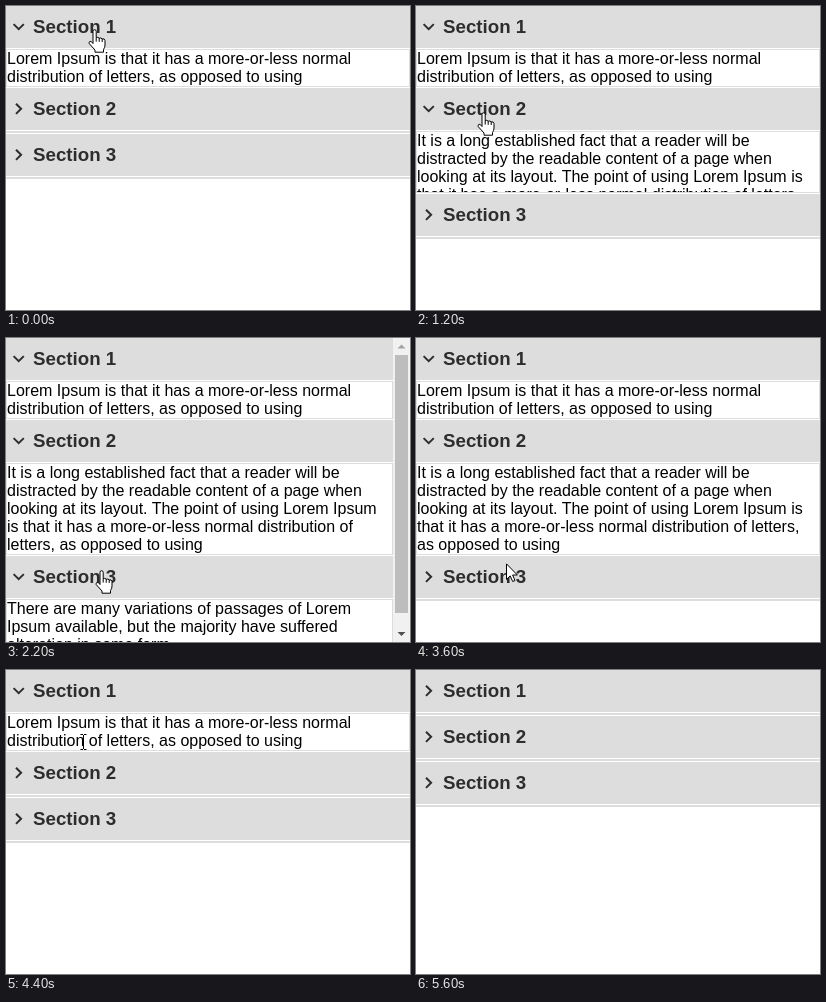
An HTML page for the animation above (6000 ms loop, 404 by 304 pixels).

```html
<!DOCTYPE html>
<html lang="en">
<head>
<meta charset="utf-8">
<title>Accordion</title>
<style>
  html, body { margin: 0; width: 100%; height: 100%; overflow: hidden; background: #fff; }
  #stage { position: relative; width: 404px; height: 304px; overflow: hidden;
    font-family: "Liberation Sans", Arial, sans-serif; }
  #list { width: 404px; }
  #list.narrow { width: 387px; }
  .head { position: relative; height: 42px; background: #ddd; color: #2d2d2d;
    font-size: 18.72px; font-weight: bold; line-height: 41px; text-indent: 27px; white-space: nowrap; }
  .head svg { position: absolute; left: 0; top: 0; }
  .panel { margin: 1px 0; border: 1px solid #ddd; overflow: hidden; color: #000;
    font-size: 16px; line-height: 18px; white-space: pre; }
  .sheet { position: absolute; left: 0; top: 0; }
</style>
</head>
<body>
<div id="stage">
  <div id="list"></div>
  <svg class="sheet" width="404" height="304">
    <g id="bar">
      <path fill="#f1f1f1" d="M387 0h17v304h-17z"/>
      <path fill="#bdbdbd" d="M389 17h13v258h-13z"/>
      <path fill="#a3a3a3" d="M391.5 10.5l4-4 4 4z"/>
      <path fill="#505050" d="M391.5 294l4 4 4-4z"/>
    </g>
    <g id="hand" fill="#fff" stroke="#000" stroke-linejoin="round">
      <path d="M5 14.5V2.3a1.6 1.6 0 0 1 3.2 0V8.6q1.6-.9 3 .6 1.8-.8 3 .7 2.3-.7 2.8 1.6V16q0 2.5-1.5 4.5v2.7H7V21L1.2 14.6q-.6-1.8.9-2.3 1.4-.2 2.9 2.2z"/>
      <path fill="none" d="M8.2 8.6v4M11.2 9.2v3.6M14.2 10v3"/>
    </g>
    <path id="arrow" fill="#fff" stroke="#000" d="M.5.9V16.4L4.2 12.9 6.7 18.5 9 17.5 6.6 12H11.4z"/>
    <path id="beam" fill="none" stroke="#000" d="M.5.5h2.5m1 0h2.5M3.5 1v14M.5 15.5h2.5m1 0h2.5"/>
  </svg>
</div>
<script>
const LOOP = 6000;
const $ = id => document.getElementById(id);

const texts = [
  ["Lorem Ipsum is that it has a more-or-less normal",
   "distribution of letters, as opposed to using"],
  ["It is a long established fact that a reader will be",
   "distracted by the readable content of a page when",
   "looking at its layout. The point of using Lorem Ipsum is",
   "that it has a more-or-less normal distribution of letters,",
   "as opposed to using"],
  ["There are many variations of passages of Lorem",
   "Ipsum available, but the majority have suffered",
   "alteration in some form"]
].map(lines => lines.join("\n"));

// The scrollbar makes the second text wrap earlier.
const narrowText = texts[1]
  .replace("Ipsum is\nthat", "Ipsum\nis that")
  .replace("of letters,\nas", "of\nletters, as");

// time, cursor, left, top
const pointer = [
  [0, "hand", 82, 23], [600, "beam", 83, 43], [800, "arrow", 75, 84],
  [1000, "hand", 61, 107], [1200, "hand", 61, 106], [1400, "beam", 86, 170],
  [1600, "hand", 96, 241], [1800, "hand", 92, 233], [2000, "hand", 89, 232],
  [3600, "arrow", 90, 225], [3800, "beam", 87, 124], [4000, "hand", 82, 112],
  [4200, "hand", 84, 100], [4400, "beam", 74, 64], [4600, "arrow", 69, 40],
  [4800, "arrow", 75, 37], [5000, "hand", 72, 26], [5200, "hand", 73, 28],
  [5400, "arrow", 102, 243], [5600, "", 0, 0]
];

// time, panel heights, turn of the first chevron while it closes
const layout = [
  [0, [36, 0, 0]], [1200, [36, 60, 0]], [1400, [36, 90, 0]],
  [2200, [36, 90, 54]], [3600, [36, 90, 0]], [4400, [36, 0, 0]],
  [5200, [36, 0, 0], 45], [5400, [0, 0, 0]]
];

const sections = texts.map((text, i) => {
  const head = document.createElement("div");
  head.className = "head";
  head.innerHTML = `Section ${i + 1}<svg width="27" height="42"><path fill="none" stroke="#2d2d2d" stroke-width="2" d="M-2.7-5.1L2.4 0-2.7 5.1"/></svg>`;
  const panel = document.createElement("div");
  panel.className = "panel";
  panel.textContent = text;
  $("list").append(head, panel);
  return { panel, chevron: head.querySelector("path") };
});

const stepAt = (steps, t) => steps.filter(s => s[0] <= t).pop();
let shownPointer, shownLayout;

function showPointer(step) {
  const [, name, x, y] = step;
  for (const id of ["hand", "arrow", "beam"]) {
    $(id).style.display = id === name ? "" : "none";
  }
  if (name) $(name).setAttribute("transform", `translate(${x} ${y})`);
}

function showLayout(step) {
  const [, heights, firstTurn] = step;
  const narrow = heights[2] > 0;
  $("list").classList.toggle("narrow", narrow);
  $("bar").style.display = narrow ? "" : "none";
  sections[1].panel.textContent = narrow ? narrowText : texts[1];
  sections.forEach(({ panel, chevron }, i) => {
    const turn = i === 0 && firstTurn || (heights[i] ? 90 : 0);
    panel.style.height = heights[i] + "px";
    chevron.setAttribute("transform", `translate(12.7 20.8) rotate(${turn})`);
  });
}

const start = performance.now();
function draw() {
  const t = (performance.now() - start) % LOOP;
  const p = stepAt(pointer, t), l = stepAt(layout, t);
  if (p !== shownPointer) showPointer(shownPointer = p);
  if (l !== shownLayout) showLayout(shownLayout = l);
  requestAnimationFrame(draw);
}
draw();
</script>
</body>
</html>
```
